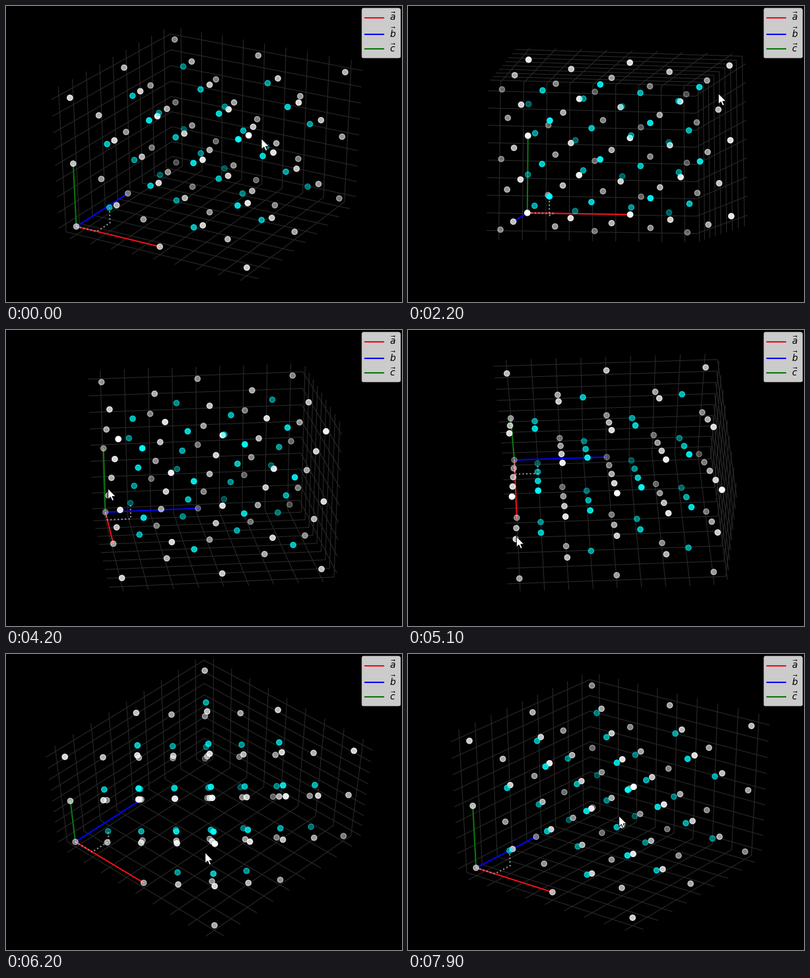
These frames come from a looping animation (600 by 449 pixels, 8 s). A matplotlib script:

```python
import itertools

import numpy as np
import matplotlib.pyplot as plt
from matplotlib.animation import FuncAnimation
from matplotlib.collections import LineCollection
from matplotlib.colors import to_rgba

W, H, DPI = 600, 449, 100
STEP, FRAMES = 100, 80
CENTER = np.array([308.5, 218.4])
SCALE = np.array([W, -H]) / 0.185
DIST = 21.75                     # camera distance in lattice units
LOW, HIGH = -0.13, 2.13          # extent of the back panes
TICKS = np.arange(0, 2.01, 0.25)

# Turning points of the drag: time, azimuth, elevation
DRAG = np.array([
    (300, -60, 30), (1300, -83.4, 22.3), (2200, -100.3, -9.1),
    (2700, -87, -31), (3300, -61.9, -11), (3900, -20, 13),
    (5100, -3, 55), (5700, -31, 67), (6200, -47, 54.7),
    (6700, -47, 50), (7900, -53.4, 30.9),
])
TIMES, VIEWS = DRAG[:, 0], DRAG[:, 1:]
SLOPES = np.gradient(VIEWS, TIMES, axis=0)

# Half a turn per stage width or height; the view trails the pointer
TURN = np.array([-180 / W, 180 / H])
GRIP = np.array([42.5, -67.5])
LAG = 110
POINTER_START = np.array([387, 201])
ARROW = np.array([(0, 0), (0, 16.5), (3.8, 13), (6.4, 18.8), (9, 17.6),
                  (6.5, 12), (11.8, 12)])

# Two interpenetrating face-centred lattices, 2 x 2 x 2 cells
halves = np.array(list(itertools.product(range(5), repeat=3)))
halves = halves[halves.sum(axis=1) % 2 == 0]
white_atoms = halves / 2
cyan_atoms = halves[halves.max(axis=1) < 4] / 2 + 0.25

VECTORS = {"a": "#ec1018", "b": "#0404f4", "c": "#08780c"}
HOPS = np.tril(np.ones((4, 3)), -1) / 4


def view(t):
    """Azimuth and elevation, by cubic Hermite interpolation."""
    t = np.clip(t, TIMES[0], TIMES[-1])
    k = min(np.searchsorted(TIMES, t, "right") - 1, len(TIMES) - 2)
    h = TIMES[k + 1] - TIMES[k]
    s = (t - TIMES[k]) / h
    ease = s * s * (3 - 2 * s)
    return (VIEWS[k] * (1 - ease) + VIEWS[k + 1] * ease
            + h * s * (1 - s) * (SLOPES[k] * (1 - s) - SLOPES[k + 1] * s))


def pointer_tip(t):
    """The pointer reaches its grip within 200 ms, then leads the view."""
    tip = (view(t + LAG) - GRIP) / TURN
    return POINTER_START + (tip - POINTER_START) * min(t / 200, 1)


def camera(azim, elev):
    """Right, up and toward-the-eye unit vectors."""
    az, el = np.radians([azim, elev])
    ca, sa, ce, se = np.cos(az), np.sin(az), np.cos(el), np.sin(el)
    return np.array([(-sa, ca, 0), (-ca * se, -sa * se, ce),
                     (ca * ce, sa * ce, se)])


def project(points, cam):
    """Screen positions and distances from the eye."""
    p = (np.asarray(points) - 1) @ cam.T
    depth = DIST - p[..., 2]
    return CENTER + SCALE * p[..., :2] / depth[..., None], depth


def grid_lines(toward):
    """Grid on the three panes farthest from the eye."""
    back = np.where(toward > 0, LOW, HIGH)
    front = LOW + HIGH - back
    lines = []
    for axis, tick in itertools.product(range(3), TICKS):
        j, k = [i for i in range(3) if i != axis]
        line = np.tile(back, (3, 1))
        line[:, axis] = tick
        line[0, j] = front[j]
        line[2, k] = front[k]
        lines.append(line)
    return np.array(lines)


fig = plt.figure(figsize=(W / DPI + 1e-6, H / DPI + 1e-6), dpi=DPI,
                 facecolor="black")
ax = fig.add_axes([0, 0, 1, 1])
ax.set(xlim=(0, W), ylim=(H, 0))
ax.axis("off")

grid = LineCollection([], colors="0.16", linewidths=0.8, zorder=1)
ax.add_collection(grid)
arrows = [ax.plot([], [], color=color, lw=1.5, zorder=2,
                  label=rf"$\vec{{{name}}}$")[0]
          for name, color in VECTORS.items()]
hops, = ax.plot([], [], ":", color="0.6", lw=1.5, zorder=2)
atoms = [(points, color, ax.scatter(*points.T[:2], s=36, c=color, zorder=3))
         for points, color in [(white_atoms, "white"), (cyan_atoms, "cyan")]]
pointer = plt.Polygon(ARROW, fc="white", ec="black", lw=0.7, zorder=9)
ax.add_patch(pointer)
legend = ax.legend(handles=arrows, loc="upper right", borderaxespad=0.23,
                   labelspacing=0.4, handletextpad=0.65, facecolor="white",
                   edgecolor="0.8", framealpha=0.8)
legend.set_zorder(8)


def draw(frame):
    t = frame * STEP
    cam = camera(*view(t))

    grid.set_segments(project(grid_lines(cam[2]), cam)[0])
    for line, end in zip(arrows, np.eye(3)):
        line.set_data(*project([np.zeros(3), end], cam)[0].T)
    hops.set_data(*project(HOPS, cam)[0].T)

    # Farther atoms come first and fade
    for points, color, dots in atoms:
        xy, depth = project(points, cam)
        order = np.argsort(-depth)
        shade = np.tile(to_rgba(color), (len(points), 1))
        shade[:, 3] = 1 - 0.7 * (depth[order] - depth.min()) / np.ptp(depth)
        dots.set_offsets(xy[order])
        dots.set_facecolor(shade)
        dots.set_edgecolor(shade)

    pointer.set_xy(ARROW + pointer_tip(t))
    return [grid, *arrows, hops, *(a[2] for a in atoms), pointer]


anim = FuncAnimation(fig, draw, frames=FRAMES, interval=STEP, repeat=True,
                     repeat_delay=0, init_func=lambda: draw(0))
plt.show()
```
